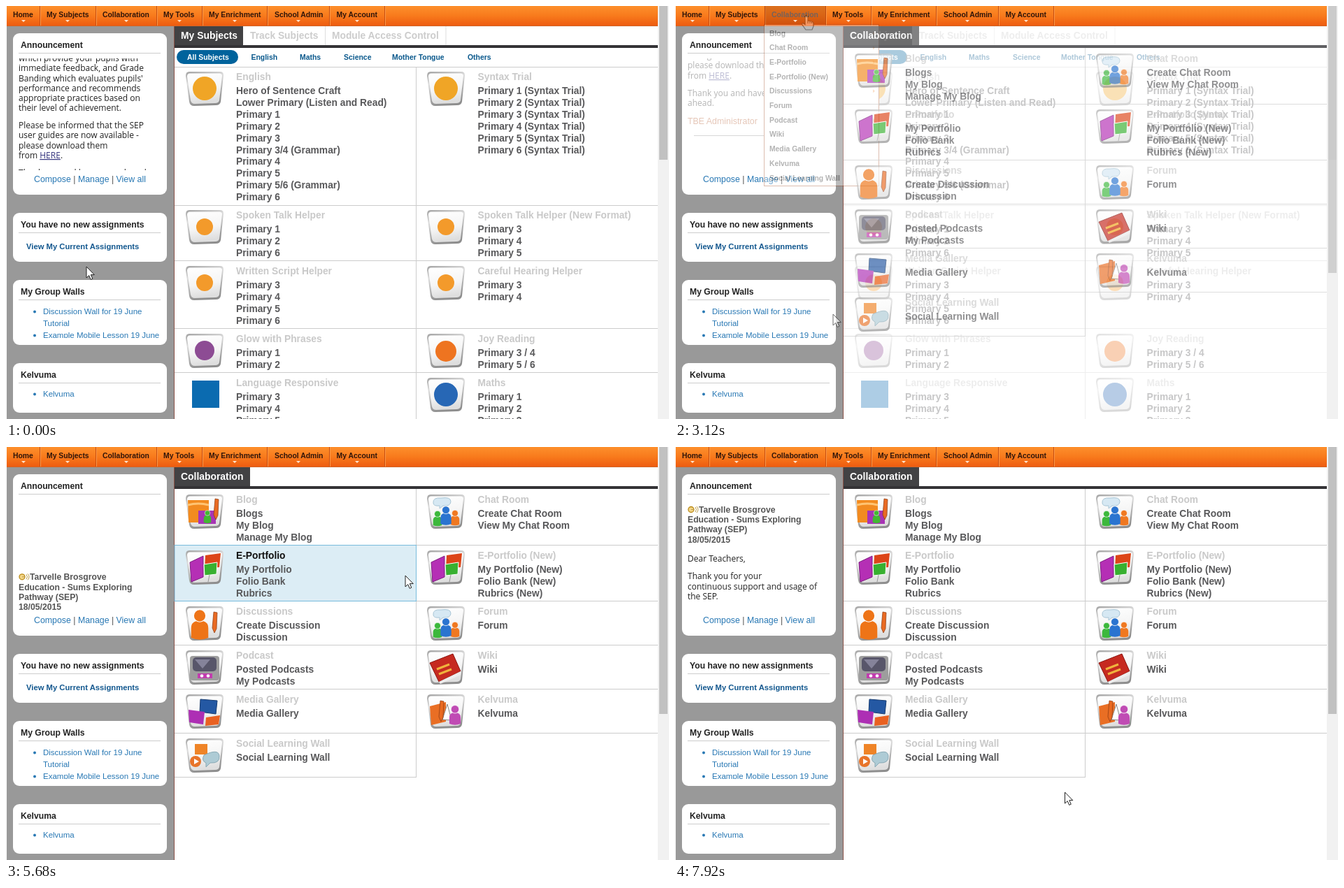
These frames come from a looping animation (948x591 px, 8 s). An HTML page:

```html
<!DOCTYPE html>
<html lang="en">
<head>
<meta charset="utf-8">
<title>School portal</title>
<style>
html, body { margin: 0; width: 100%; height: 100%; overflow: hidden; background: #fff; }
svg { display: block; font: 700 13.8px "Liberation Sans", Arial, sans-serif; }
.thin { font-weight: 400; }
.news { font: 400 12px "Open Sans", sans-serif; }
</style>
</head>
<body>
<svg id="stage" width="948" height="591" viewBox="0 0 948 591">
  <defs>
    <linearGradient id="orange" x2="0" y2="1">
      <stop stop-color="#fd8f2c"/><stop offset=".5" stop-color="#f87a1c"/><stop offset="1" stop-color="#ee5c10"/>
    </linearGradient>
    <linearGradient id="silver" x2=".3" y2="1">
      <stop stop-color="#a2a2a2"/><stop offset=".35" stop-color="#dcdcdc"/><stop offset="1" stop-color="#8e8e8e"/>
    </linearGradient>
    <linearGradient id="glass" x2=".2" y2="1">
      <stop stop-color="#fff"/><stop offset=".6" stop-color="#f5f5f5"/><stop offset="1" stop-color="#dedede"/>
    </linearGradient>
    <clipPath id="newsClip"><path d="M11 75H229V235H11z"/></clipPath>
    <clipPath id="wallClip"><path d="M11 425H229V475H11z"/></clipPath>
  </defs>
  <g id="base"></g>
  <g id="subjects"></g>
  <g id="collab"></g>
</svg>
<script>
const LOOP = 8000, STEP = 80, SPEED = 0.043;
const $ = id => document.getElementById(id);
const clamp = v => Math.max(0, Math.min(1, v));
// baselines sit on whole pixels
const text = (x, y, s, size = 13.8, fill = '#58585a', extra = '') =>
  `<text x="${x}" y="${Math.round(y)}" font-size="${size}" fill="${fill}" ${extra}>${s}</text>`;
const rect = (x, y, w, h, fill, extra = '') =>
  `<rect x="${x}" y="${y}" width="${w}" height="${h}" fill="${fill}" ${extra}/>`;
const path = (d, fill, extra = '') => `<path d="${d}" fill="${fill}" ${extra}/>`;
const dot = (x, y, r, fill, extra = '') => `<circle cx="${x}" cy="${y}" r="${r}" fill="${fill}" ${extra}/>`;
const thin = 'class="thin"';
const blue = '#2878b4';

// Icons, drawn in a 54 x 50 box
const person = (x, y, c, k = 1) =>
  `<g transform="translate(${x} ${y}) scale(${k})">` +
  path('M-7 20V12Q-7 6 0 6T7 12V20Q0 23-7 20z', c) + dot(0, 2, 5, c, 'stroke="#fff" stroke-width=".7"') + '</g>';
const pen = (x, y) => path(`M${x} ${y}l5 1-1 23-3 6-3-7z`, '#e96a22', 'stroke="#8a3a12" stroke-width=".7"');
const bubble = path('M9 12Q8 4 20 5Q34 3 34 10T23 16L18 20V16Q9 17 9 12z', '#d6e8f3', 'stroke="#a9c6d6"');
const people = bubble + person(15, 26, '#3cb83c', .9) + person(40, 25, '#f07820', .9) + person(27, 20, '#2a74d0', 1.1);
const folio = path('M6 17L25 8V38L8 45z', '#b52fb5', 'stroke="#7d1b80"') +
  path('M28 7L50 4 48 24 27 26z', '#dd4518') + path('M26 20L45 17 44 34 27 36z', '#38b030', 'stroke="#fff"') +
  path('M34 35l-2 10', 'none', 'stroke="#999"');
const art = {
  blog: path('M3 8H33V40H4z', '#f28b20') + path('M3 15Q18 11 33 15', 'none', 'stroke="#ffc473" stroke-width="3"') +
    rect(18, 23, 25, 19, '#a834b5') + person(31, 25, '#43b833', .75) + pen(42, 6),
  people, folio,
  discuss: person(20, 10, '#ee7417', 1.75) + pen(40, 8),
  tv: rect(6, 8, 42, 35, '#9d9d9d', 'rx="4"') + rect(10, 10, 34, 20, '#58566a', 'rx="5"') +
    path('M13 13H35L24 26z', '#85839a') + rect(17, 33, 21, 7, '#c13cae') + dot(23, 36.5, 2.3, '#fff') + dot(32, 36.5, 2.3, '#fff'),
  book: path('M4 18L37 5 48 30 17 45z', '#c62a20', 'stroke="#8b1510"') + path('M17 45L48 30V35L19 48z', '#eee') +
    path('M14 27L32 20M17 34L35 27', 'none', 'stroke="#f0b33c" stroke-width="3"'),
  media: path('M21 7L45 9 43 28 20 25z', '#2458a3', 'stroke="#163b70"') + path('M4 22L27 25 25 43 5 40z', '#ad2fb4') +
    path('M29 33L49 30 47 43 28 45z', '#e96121'),
  mind: path('M4 17L27 11V39L6 44z', '#e96e24') + path('M22 36L29 14 35 37z', '#fff', 'stroke="#888"') +
    pen(19, 9) + person(40, 19, '#c04bb4', 1.15),
  social: rect(13, 8, 18, 15, '#ef8427') + dot(14, 33, 8, '#e8742a') + path('M12 29l7 4-7 4z', '#fff') +
    path('M26 24Q47 14 48 25T35 35L29 41V35Q22 32 26 24z', '#aecbd5', 'stroke="#89a9b5"'),
  yellow: dot(27, 24, 17, '#f0a526'),
  gold: dot(27, 24, 12, '#f39a2b'),
  purple: dot(27, 24, 14, '#8d4c94'),
  red: dot(27, 25, 15, '#ee7420'),
  navy: dot(27, 24, 17, '#2767b5')
};
const frame = path('M5 0H49Q54 0 54 5L50 43Q49 48 43 48L12 49Q6 49 5 43L0 6Q0 0 5 0z', 'url(#silver)') +
  path('M6 2.5H48Q52 2.5 52 6L48 41Q47 45 42 45L13 46Q8 46 7 41L2 7Q2 2.5 6 2.5z', 'url(#glass)');
const icon = (kind, x, y) => `<g transform="translate(${x} ${y})">` +
  (kind === 'square' ? rect(9, 4, 39, 39, '#0b6bb0') : frame + art[kind]) + '</g>';

const primary = (list, tail = '') => [...list].map(n => `Primary ${n}${tail}`);
const subjectRows = [
  [87, ['English', 'yellow', ['Hero of Sentence Craft', 'Lower Primary (Listen and Read)', ...primary('123'),
    'Primary 3/4 (Grammar)', ...primary('45'), 'Primary 5/6 (Grammar)', 'Primary 6']],
    ['Syntax Trial', 'yellow', primary('123456', ' (Syntax Trial)')]],
  [285, ['Spoken Talk Helper', 'gold', primary('126')], ['Spoken Talk Helper (New Format)', 'gold', primary('345')]],
  [365, ['Written Script Helper', 'gold', primary('3456')], ['Careful Hearing Helper', 'gold', primary('34')]],
  [462, ['Glow with Phrases', 'purple', primary('12')], ['Joy Reading', 'red', ['Primary 3 / 4', 'Primary 5 / 6']]],
  [525, ['Language Responsive', 'square', primary('345')], ['Maths', 'navy', primary('123')]]
];
const collabRows = [
  [61, ['Blog', 'blog', ['Blogs', 'My Blog', 'Manage My Blog']],
    ['Chat Room', 'people', ['Create Chat Room', 'View My Chat Room']]],
  [141, ['E-Portfolio', 'folio', ['My Portfolio', 'Folio Bank', 'Rubrics']],
    ['E-Portfolio (New)', 'folio', ['My Portfolio (New)', 'Folio Bank (New)', 'Rubrics (New)']]],
  [221, ['Discussions', 'discuss', ['Create Discussion', 'Discussion']], ['Forum', 'people', ['Forum']]],
  [284, ['Podcast', 'tv', ['Posted Podcasts', 'My Podcasts']], ['Wiki', 'book', ['Wiki']]],
  [347, ['Media Gallery', 'media', ['Media Gallery']], ['Kelvuma', 'mind', ['Kelvuma']]],
  [410, ['Social Learning Wall', 'social', ['Social Learning Wall']]]
];
const bottoms = [141, 221, 284, 347, 410, 473];

function cell(entry, col, y, hot, link) {
  if (!entry) return '';
  const [title, kind, items] = entry, x = col ? 674.5 : 329;
  return icon(kind, col ? 602 : 257, y + 7) +
    text(x, y + 19, title, 13.8, hot ? (link ? '#2c6238' : '#111') : '#c9c9c9') +
    items.map((s, i) => link && !i
      ? text(x, y + 39, s, 13.8, '#1a68a4', 'text-decoration="underline"')
      : text(x, y + 39 + i * 16.9, s)).join('');
}
const grid = (rows, hot = -1, link = false) => rows.map(([y, ...pair], r) =>
  pair.map((e, c) => cell(e, c, y, hot === r * 2 + c, link)).join('')).join('');
const hline = (y, w = 691) => rect(241, y, w, 1, '#ccc');

// Shared chrome: navigation bar and side panels
const nav = [['Home', 10, 25, 48], ['My Subjects', 58, 88, 128], ['Collaboration', 138, 172, 215], ['My Tools', 225, 248, 280],
  ['My Enrichment', 290, 327, 373], ['School Admin', 384, 418, 462], ['My Account', 472.5, 502, 541]];
const navItem = ([s, x, mid], fill) => text(x, 16, s, 10.4, fill) + path(`M${mid - 3} 20h6l-3 3z`, '#ffe6d0');
const panel = (y, h, title) => rect(10, y, 220, h, '#fff', 'rx="9"') +
  text(21, y + 21, title, 12.2, '#222') + rect(18, y + 28, 203, 1, '#ccc');
const bullet = (y, s) => dot(41, y - 3.5, 2, blue) + text(53, y, s, 11.5, blue, thin);
const tab = (w, s) => rect(241, 29, w, 28, '#424244') + text(250, 47, s, 13.9, '#fff') + rect(241, 56, 691, 4, '#343336');
const thumb = h => rect(934, 0, 12, h, '#c1c1c1');

$('base').innerHTML = rect(0, 0, 948, 591, '#fff') + rect(1, 28, 239, 563, '#999') + rect(240, 28, 1, 563, '#8a5248') +
  rect(1, 0, 931, 28, 'url(#orange)') + rect(1, 28, 931, 1, '#d0662a') +
  nav.map(n => navItem(n, '#30150a') + rect(n[3], 0, 1, 28, '#c64d10') + rect(n[3] + 1, 0, 1, 28, '#ff9a48')).join('') +
  panel(39, 231, 'Announcement') + panel(296, 70, 'You have no new assignments') +
  panel(392, 93, 'My Group Walls') + panel(511, 71, 'Kelvuma') +
  text(40, 252, `Compose <tspan fill="#555">|</tspan> Manage <tspan fill="#555">|</tspan> View all`, 12.35, blue, thin) +
  text(29, 348, 'View My Current Assignments', 11.25, '#13588f') +
  `<g clip-path="url(#wallClip)">${bullet(441, 'Discussion Wall for 19 June')}${text(53, 458, 'Tutorial', 11.5, blue, thin)}` +
  `${bullet(475, 'Example Mobile Lesson 19 June')}</g>` + bullet(559, 'Kelvuma') +
  rect(932, 0, 16, 591, '#f1f1f1');

// Subjects page
const filters = [['English', 350.5], ['Maths', 420], ['Science', 483], ['Mother Tongue', 552], ['Others', 660]];
const subjectsPage = thumb(220) + tab(98, 'My Subjects') + text(349, 47, 'Track Subjects', 13.8, '#ccc') +
  text(466, 47, 'Module Access Control', 13.8, '#ccc') + rect(456, 29, 1, 27, '#ddd') + rect(628.5, 29, 1, 27, '#ddd') +
  rect(244, 63, 88, 20, '#00639c', 'rx="10"') + text(259, 77, 'All Subjects', 10.45, '#fff') +
  filters.map(([s, x]) => text(x, 77, s, 10.45, '#09588c')).join('') +
  [87, 285, 364, 461, 524].map(y => hline(y)).join('') + rect(586, 87, 1, 504, '#ccc') + grid(subjectRows);

const menuItems = ['Blog', 'Chat Room', 'E-Portfolio', 'E-Portfolio (New)', 'Discussions', 'Forum', 'Podcast',
  'Wiki', 'Media Gallery', 'Kelvuma', 'Social Learning Wall'];
const menu = rect(128, 0, 87.5, 28, '#9a3608') + navItem(nav[2], '#fff') +
  rect(127.5, 26.5, 164, 231, '#fff', 'stroke="#97390f"') +
  menuItems.map((s, i) => text(135, 42.5 + i * 20.7, s, 10.35, '#1c1c1c') +
    (i < 5 || i === 6 ? path(`M283 ${36.5 + i * 20.7}l3 2.5-3 2.5z`, '#f0a060') : '')).join('');

// Collaboration page
const collabFrame = thumb(382) + tab(108, 'Collaboration');
const collabLines = [140, 220, 283, 346, 409].map(y => hline(y)).join('') + hline(472, 346) + rect(586, 60, 1, 412, '#ccc');

// Scrolling announcement: [offset, words]
const endNews = [[-96, 'which provide your pupils with'], [-81.8, 'immediate feedback, and Grade'],
  [-67.5, 'Banding which evaluates pupils\''], [-53.3, 'performance and recommends'], [-39, 'appropriate practices based on'],
  [-25, 'their level of achievement.'], [0, 'Please be informed that the SEP'], [14.2, 'user guides are now available -'],
  [28.5, 'please download them'],
  [43, 'from <tspan fill="#35357e" text-decoration="underline">HERE</tspan>.'],
  [68, 'Thank you and have a good week'], [82, 'ahead.']];
const startNews = [[70, 'Dear Teachers,'], [95.3, 'Thank you for your'], [109.5, 'continuous support and usage of'], [123.6, 'the SEP.']];
const lines = (list, y) => list.map(([d, s]) => text(18, y + d, s, 12, '#222', 'class="news"')).join('');
const clipNews = s => `<g clip-path="url(#newsClip)">${s}</g>`;

function closing(y) {
  return clipNews(lines(endNews, y) + text(18, y + 108, 'TBE Administrator', 12.4, '#b2562a', thin) +
    rect(27, Math.round(y + 124), 175, 1, '#888'));
}
function opening(y) {
  const heading = ['Tarvelle Brosgrove', 'Education - Sums Exploring', 'Pathway (SEP)', '18/05/2015'];
  return clipNews(dot(23, y - 4.5, 4, '#f3d587', 'stroke="#b98916" stroke-width="1.3"') +
    path(`M23 ${y - 4.5}h4M29 ${y - 8}q3 3.5 0 7M31 ${y - 9}q4 4.5 0 9`, 'none', 'stroke="#b99a4a"') +
    heading.map((s, i) => text(i ? 18 : 34, y + i * 14.2, s, 12.2, '#555')).join('') + lines(startNews, y));
}

// Pointer
const pointers = {
  arrow: path('M0 0V16L3.7 12.6 6.2 18.4 8.8 17.2 6.3 11.6H11.3z', '#fff', 'stroke="#222"'),
  hand: path('M-2 1.5Q0-1 2 1.5V8l5 1q3 .5 3 3v4l-2 5H-1l-5-7q-1-2 1-2.5l3 2z', '#fff', 'stroke="#222" stroke-width="1.2"') +
    path('M2 8v4M5 9v3M7.5 10v2', 'none', 'stroke="#222"'),
  beam: path('M-4-7.5H-1L0-6.5 1-7.5H4M0-6.5V6.5M-4 7.5H-1L0 6.5 1 7.5H4', 'none', 'stroke="#333" stroke-width="1.2"')
};
const pointer = (kind, [x, y]) => `<g transform="translate(${x} ${y})">${pointers[kind]}</g>`;
const pathA = [[0, 115, 373], [640, 115, 373], [880, 136, 302], [1040, 161, 188], [1120, 162, 182], [1460, 172, 75],
  [1600, 188, 13], [LOOP, 188, 13]];
const pathB = [[0, 226, 441], [3640, 226, 441], [4080, 354, 100], [4240, 354, 100], [4480, 450, 101], [4880, 655, 108],
  [5200, 668, 180], [5440, 640, 184], [5680, 571, 184], [5800, 569, 188], [6240, 557, 326], [6640, 554, 398],
  [6960, 557, 480], [7200, 557.5, 494], [LOOP, 557.5, 494]];
function along(keys, t) {
  const i = keys.findIndex(k => k[0] > t), [t0, x0, y0] = keys[i - 1], [t1, x1, y1] = keys[i];
  const k = (t - t0) / (t1 - t0);
  return [x0 + (x1 - x0) * k, y0 + (y1 - y0) * k];
}

function drawSubjects(t) {
  const at = along(pathA, t), inNav = at[1] < 28;
  const inNews = at[1] > 75 && at[1] < 235;
  // the text rests while the pointer is over it
  const scrolled = SPEED * (Math.min(t, 1000) + Math.max(0, t - 1467));
  return subjectsPage + closing(175 - scrolled) + (inNav ? menu : '') +
    (t >= 2480 && t < 2720 ? dot(179.5, 10, 10, 'none', 'stroke="#f7e600" stroke-width="3"') : '') +
    pointer(inNav ? 'hand' : inNews ? 'beam' : 'arrow', at);
}
function drawCollab(t) {
  const at = along(pathB, t), [x, y] = at;
  const row = bottoms.findIndex(b => y < b), col = x > 587 ? 1 : 0;
  const hot = x > 241 && row >= 0 && y > 60 ? row * 2 + col : -1;
  const link = hot === 0 && x > 328 && x < 368 && y < 104;
  let glow = '';
  if (hot >= 0) {
    const top = collabRows[row][0], left = col ? 587 : 241;
    glow = rect(left, top - .5, col ? 345 : 345.5, bottoms[row] - top, '#dcedf5', 'stroke="#78bbdc"');
  }
  return collabFrame + collabLines + glow + grid(collabRows, hot, link) +
    opening(94 + (7920 - t) * SPEED) + pointer(link ? 'hand' : 'arrow', at);
}

let last = -1;
function tick(now) {
  const t = Math.floor(now % LOOP / STEP) * STEP;
  if (t !== last) {
    last = t;
    const fade = clamp((t - 2640) / 720);
    $('subjects').style.opacity = 1 - fade;
    $('collab').style.opacity = fade;
    $('subjects').innerHTML = fade < 1 ? drawSubjects(t) : '';
    $('collab').innerHTML = fade > 0 ? drawCollab(t) : '';
  }
  requestAnimationFrame(tick);
}
tick(0);
</script>
</body>
</html>
```
